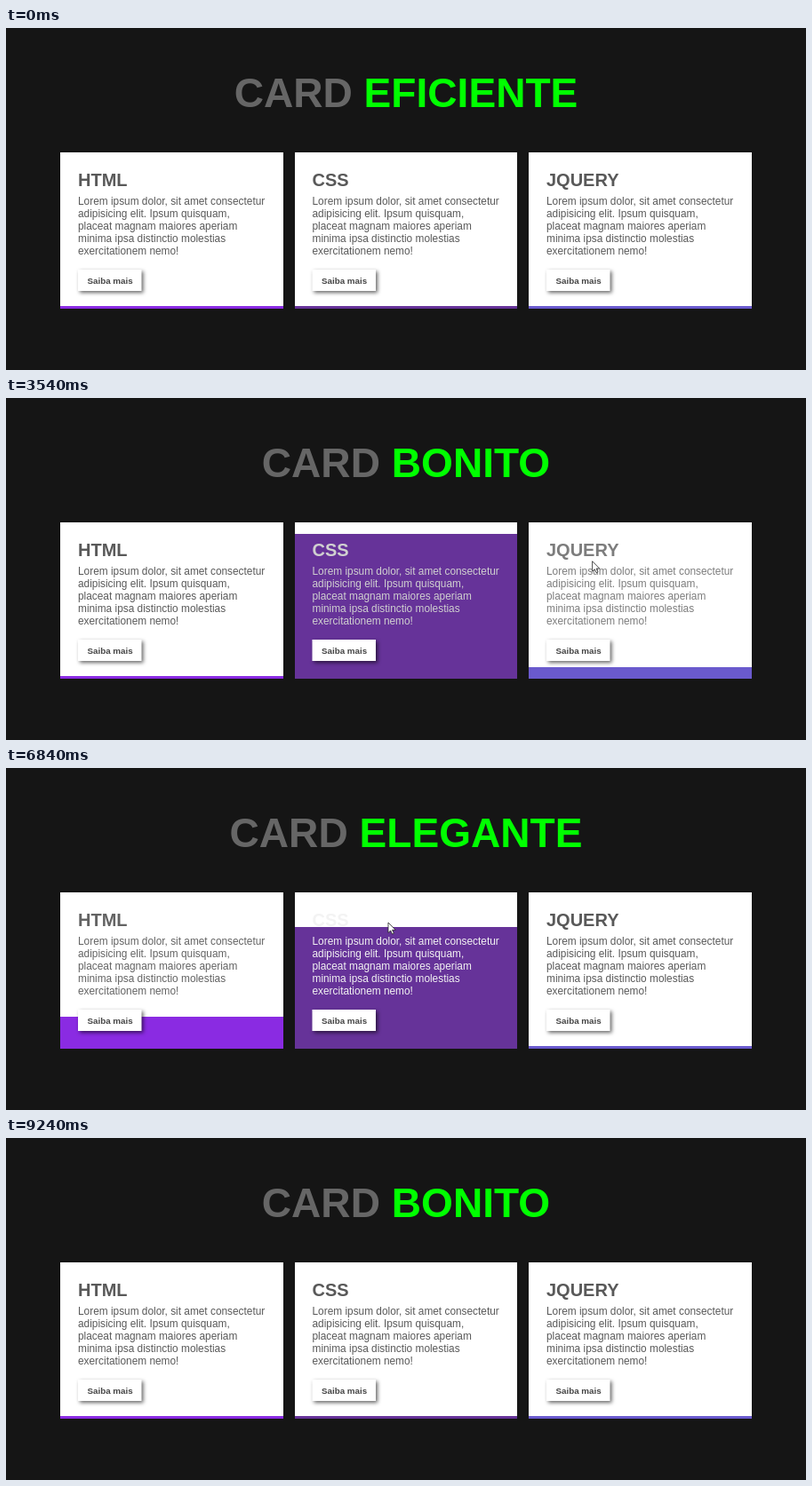
An HTML page for the animation above (9.27 s loop, 900 by 385 pixels).

```html
<!DOCTYPE html>
<html lang="pt-BR">
<head>
<meta charset="utf-8">
<title>Cards</title>
<style>
  html, body { margin: 0; width: 100%; height: 100%; overflow: hidden; background: #151515; }
  svg { display: block; font-family: "Liberation Sans", Arial, sans-serif; }
  .title { font-size: 46.1px; font-weight: bold; text-anchor: middle; fill: #666; }
  .name { font-size: 20px; font-weight: bold; }
  .body { font-size: 11.87px; }
  .label { font-size: 9.8px; font-weight: bold; fill: #444; }
  .button { fill: #fff; filter: drop-shadow(2px 2px 2px rgba(0, 0, 0, .6)); }
  .card, .fill { shape-rendering: crispEdges; }
</style>
</head>
<body>
<svg width="900" height="385" viewBox="0 0 900 385">
  <text class="title" x="450" y="89">CARD <tspan id="word" fill="#0f0"></tspan></text>
  <g id="cards"></g>
  <path id="arrow" d="M0 0V11.5L2.7 9L4.5 13L6.4 12.2L4.6 8.3H8.2Z" fill="#fff" stroke="#222" stroke-width=".8"/>
  <path id="beam" d="M-2.5 -5.5H-.7L0 -5L.7 -5.5H2.5M0 -5V5M-2.5 5.5H-.7L0 5L.7 5.5H2.5" fill="none" stroke="#222"/>
</svg>
<script>
const LOOP = 9270, FADE = 500, WORD_TIME = 675, WORD_OFFSET = 120;
const WORDS = ['EFICIENTE', 'BONITO', 'ELEGANTE', 'MODERNO'];
const LINES = [
  'Lorem ipsum dolor, sit amet consectetur',
  'adipisicing elit. Ipsum quisquam,',
  'placeat magnam maiores aperiam',
  'minima ipsa distinctio molestias',
  'exercitationem nemo!'
];
const CARDS = [
  { name: 'HTML', color: '#8a2be2' },
  { name: 'CSS', color: '#639' },
  { name: 'JQUERY', color: '#6a5acd' }
];
const LEFT = 61, TOP = 140, BOTTOM = 316, WIDTH = 250.6, PITCH = 263.5, BAR = 3.3;

// The pointer enters a card, settles at a resting place and crosses to the next one.
const GAP = 14, SETTLE = 340, DEPART = 200;
const VISITS = [
  { card: 0, enter: 1400, x: 215, y: 212 },
  { card: 1, enter: 2510, x: 470, y: 190 },
  { card: 2, enter: 3458, x: 769, y: 181 },
  { card: 1, enter: 4575, x: 470, y: 205 },
  { card: 0, enter: 5474, x: 159, y: 198 },
  { card: 1, enter: 6506, x: 430, y: 174 },
  { card: 2, enter: 7503, x: 764, y: 206 }
];
const ENTRY = { x: 44, y: -16 }, EXIT = { enter: 8485, x: 908, y: 195 };

const $ = id => document.getElementById(id);
const clamp = (v, lo, hi) => Math.min(hi, Math.max(lo, v));
const mix = (a, b, k) => a + (b - a) * k;

function bezier(x1, y1, x2, y2) {
  const at = (a, b, s) => 3 * a * s * (1 - s) ** 2 + 3 * b * s * s * (1 - s) + s ** 3;
  return x => {
    if (x <= 0) return 0;
    if (x >= 1) return 1;
    let lo = 0, hi = 1;
    for (let i = 0; i < 20; i++) {
      const mid = (lo + hi) / 2;
      if (at(x1, x2, mid) < x) lo = mid; else hi = mid;
    }
    return at(y1, y2, lo);
  };
}
const ease = bezier(.25, .1, .25, 1), easeInOut = bezier(.42, 0, .58, 1);

// Where the pointer crosses a card's edge on its way from or to another point.
function edge(card, other, rest) {
  const left = LEFT + card * PITCH;
  return { x: clamp(other.x, left, left + WIDTH), y: (other.y + rest.y) / 2 };
}

VISITS.forEach((visit, i) => {
  const next = VISITS[i + 1] || EXIT;
  visit.leave = next.enter - GAP;
  visit.from = edge(visit.card, VISITS[i - 1] || ENTRY, visit);
  visit.to = edge(visit.card, next, visit);
});

function pointerAt(t) {
  const first = VISITS[0];
  if (t < first.enter) return travel(ENTRY, first.from, (t - first.enter + 250) / 250);
  const visit = VISITS.findLast(v => v.enter <= t);
  if (t >= visit.leave) {
    const next = VISITS[VISITS.indexOf(visit) + 1];
    return next ? travel(visit.to, next.from, (t - visit.leave) / GAP)
                : travel(visit.to, EXIT, (t - visit.leave) / 100);
  }
  const leaving = (t - visit.leave + DEPART) / DEPART;
  return leaving > 0 ? travel(visit, visit.to, leaving * leaving)
                     : travel(visit.from, visit, ease((t - visit.enter) / SETTLE));
}

function travel(a, b, k) {
  k = clamp(k, 0, 1);
  return { x: mix(a.x, b.x, k), y: mix(a.y, b.y, k) };
}

$('cards').innerHTML = CARDS.map((card, i) => `
  <g transform="translate(${LEFT + i * PITCH} 0)">
    <rect class="card" y="${TOP}" width="${WIDTH}" height="${BOTTOM - TOP}" fill="#fff"/>
    <rect class="fill" width="${WIDTH}" fill="${card.color}"/>
    <g class="copy">
      <text class="name" x="20" y="178">${card.name}</text>
      ${LINES.map((line, n) => `<text class="body" x="20" y="${199 + n * 14}">${line}</text>`).join('')}
    </g>
    <rect class="button" x="20" y="272" width="71.5" height="24"/>
    <text class="label" x="30.5" y="287.5">Saiba mais</text>
  </g>`).join('');
const fills = document.querySelectorAll('.fill'), copies = document.querySelectorAll('.copy');

const level = (card, curve, t) => VISITS.filter(v => v.card === card).reduce(
  (sum, v) => sum + curve((t - v.enter) / FADE) - curve((t - v.leave) / FADE), 0);

function drawPointer({ x, y }) {
  const inner = (x - LEFT) % PITCH;
  const overText = inner > 20 && inner < 231 && y > 189 && y < 258;
  for (const id of ['arrow', 'beam']) {
    $(id).setAttribute('transform', `translate(${x} ${y})`);
    $(id).style.display = (id === 'beam') === overText ? '' : 'none';
  }
}

function draw(t) {
  $('word').textContent = WORDS[Math.floor((t + WORD_OFFSET) / WORD_TIME) % WORDS.length];
  CARDS.forEach((_, i) => {
    const height = mix(BAR, BOTTOM - TOP, level(i, easeInOut, t));
    const gray = Math.round(mix(89, 255, level(i, ease, t)));
    fills[i].setAttribute('y', BOTTOM - height);
    fills[i].setAttribute('height', height);
    copies[i].setAttribute('fill', `rgb(${gray},${gray},${gray})`);
  });
  drawPointer(pointerAt(t));
}

const start = performance.now();
function tick() {
  draw((performance.now() - start) % LOOP);
  requestAnimationFrame(tick);
}
tick();
</script>
</body>
</html>
```
